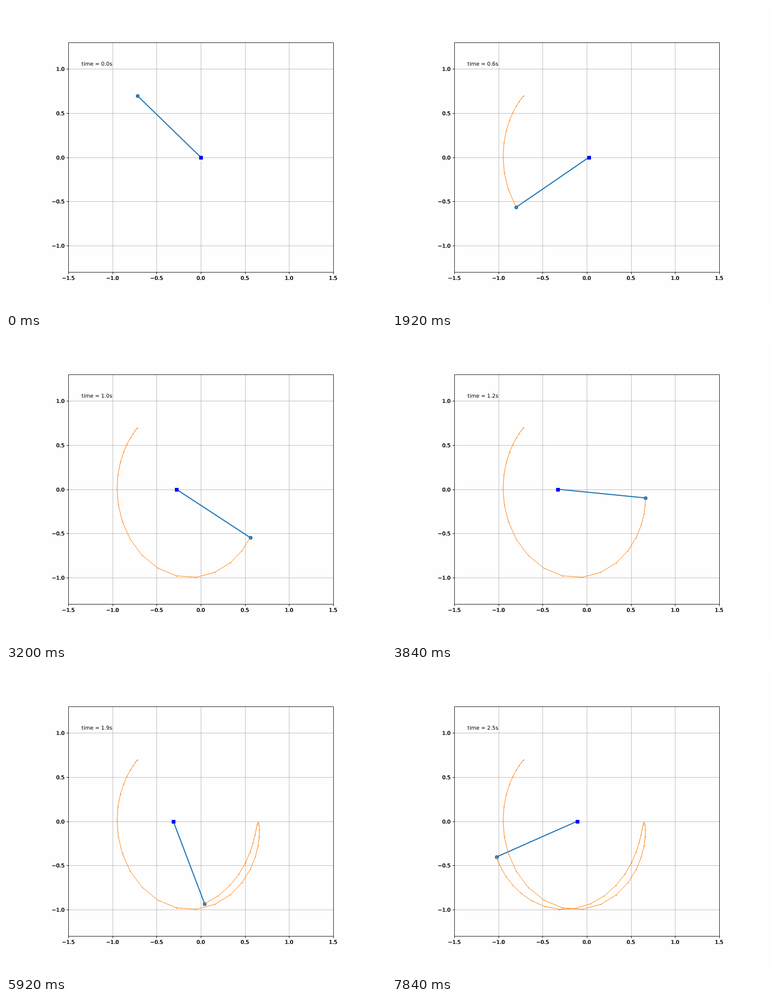
These frames come from a looping animation (720x576 px, 8 s). An HTML page:

```html
<!DOCTYPE html>
<html lang="en">
<head>
<meta charset="utf-8">
<title>Pendulum on a cart</title>
<style>
  html, body { margin: 0; width: 100%; height: 100%; overflow: hidden; background: #fefefe; }
  svg { display: block; width: 720px; height: 576px; }
  text { font: 10px "DejaVu Sans", sans-serif; text-rendering: geometricPrecision; }
</style>
</head>
<body>
<svg id="stage" viewBox="0 0 720 576"></svg>
<script>
const STEP = 160, COUNT = 50, DT = 0.05;
const CX = 369, CY = 286.56, UNIT = 167.26;
const stage = document.getElementById('stage');

const px = x => CX + x * UNIT;
const py = y => CY - y * UNIT;
const snap = v => Math.round(v) + 0.5;
const label = v => v.toFixed(1).replace('-', '\u2212');
const range = (from, to, step) =>
  Array.from({ length: Math.round((to - from) / step) + 1 }, (_, i) => from + i * step);

function set(el, attrs) {
  for (const key in attrs) el.setAttribute(key, attrs[key]);
}
function add(name, attrs, text = '') {
  const el = document.createElementNS('http://www.w3.org/2000/svg', name);
  set(el, attrs);
  el.textContent = text;
  return stage.appendChild(el);
}
const stroke = (d, color, width, cap = 'butt') =>
  add('path', { d, stroke: color, 'stroke-width': width, fill: 'none', 'stroke-linecap': cap });

// Damped pendulum of length 1 on a free cart; the angle is measured from straight down
const G = 9.8, MASS_RATIO = 0.2, DAMPING = 0.5;
function slope([x, v, angle, spin]) {
  const s = Math.sin(angle), c = Math.cos(angle), d = 1 + MASS_RATIO * s * s;
  return [
    v,
    MASS_RATIO * s * (spin * spin + G * c) / d,
    spin,
    -s * ((1 + MASS_RATIO) * G + MASS_RATIO * spin * spin * c) / d - DAMPING * spin
  ];
}
function rungeKutta(state, h) {
  const shift = (k, f) => state.map((v, i) => v + k[i] * f);
  const k1 = slope(state);
  const k2 = slope(shift(k1, h / 2));
  const k3 = slope(shift(k2, h / 2));
  const k4 = slope(shift(k3, h));
  return state.map((v, i) => v + h / 6 * (k1[i] + 2 * k2[i] + 2 * k3[i] + k4[i]));
}

const poses = [];
let state = [0, 0, 0.8 - Math.PI, 0];
for (let i = 0; i < COUNT; i++) {
  const [x, , angle] = state;
  poses.push({ cart: px(x), x: px(x + Math.sin(angle)), y: py(-Math.cos(angle)) });
  for (let n = 0; n < 10; n++) state = rungeKutta(state, DT / 10);
}

// One decimal, ties to even
function clock(i) {
  const tie = i % 10 === 5;
  return tie ? (Math.round(i / 4) / 5).toFixed(1) : (i * DT).toFixed(1);
}

// Axes
const left = 118.5, right = 620.5, top_ = 69.5, bottom = 504.5;
const xTicks = range(-1.5, 1.5, 0.5), yTicks = range(-1, 1, 0.5);
const vertical = (v, to) => `M${snap(px(v))} ${bottom}${to}`;
const horizontal = (v, to) => `M${left} ${snap(py(v))}${to}`;

stroke(xTicks.slice(1, -1).map(v => vertical(v, `V${top_}`)).join('') +
       yTicks.map(v => horizontal(v, `H${right}`)).join(''), '#b0b0b0', 0.8);

const rod = stroke('', '#1f77b4', 2);
const ball = add('circle', { r: 3.5, fill: '#1f77b4' });
const trail = stroke('', '#ff7f0e', 1);
const dots = stroke('', '#ff7f0e', 1.8, 'round');
const cart = add('rect', { y: 284, width: 7, height: 7, fill: '#00f' });

stroke(xTicks.map(v => vertical(v, 'v3.5')).join('') +
       yTicks.map(v => horizontal(v, 'h-3.5')).join(''), '#000', 0.95);
stroke(`M${left} ${top_}H${right}V${bottom}H${left}Z`, '#000', 0.85);

// Labels are struck twice, which makes them look heavier
for (const shift of [-0.4, 0.4]) {
  for (const v of xTicks)
    add('text', { x: px(v) + shift, y: 519, 'text-anchor': 'middle' }, label(v));
  for (const v of yTicks)
    add('text', { x: 111 + shift, y: snap(py(v)) + 3.5, 'text-anchor': 'end' }, label(v));
}
const time = add('text', { x: 143, y: 113 });

function draw(ms) {
  const i = Math.floor(ms / STEP) % COUNT;
  const pose = poses[i], path = poses.slice(0, i + 1);
  set(rod, { d: `M${pose.cart} ${CY}L${pose.x} ${pose.y}` });
  set(ball, { cx: snap(pose.x), cy: snap(pose.y) });
  set(trail, { d: 'M' + path.map(p => `${p.x} ${p.y}`).join('L') });
  set(dots, { d: path.map(p => `M${snap(p.x)} ${snap(p.y)}h.01`).join('') });
  set(cart, { x: snap(pose.cart) - 3.5 });
  time.textContent = `time = ${clock(i)}s`;
}

const start = performance.now();
function tick() {
  draw(performance.now() - start);
  requestAnimationFrame(tick);
}
tick();
</script>
</body>
</html>
```
